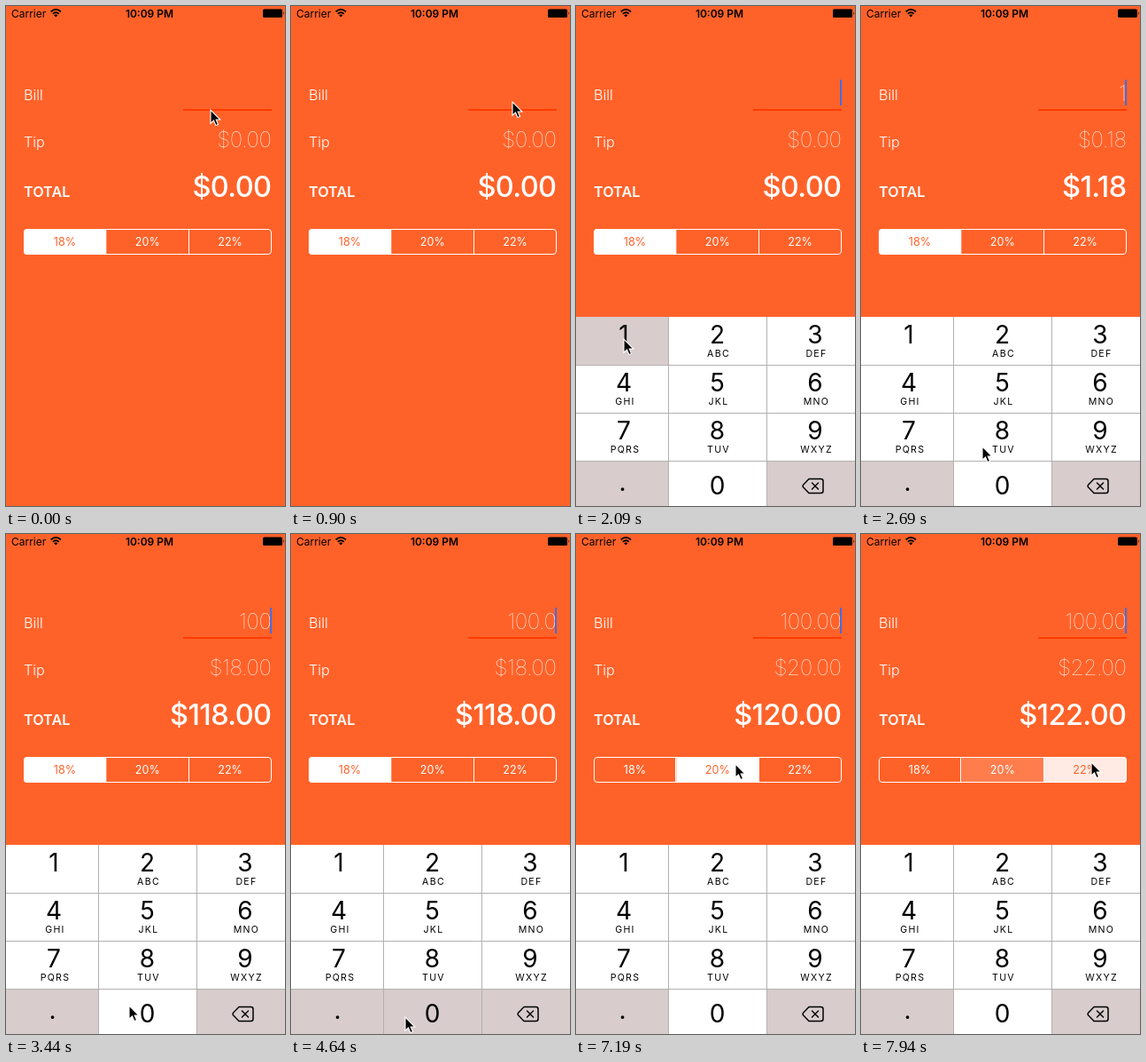
Recreate the animation shown at these times as an HTML page. Size 315 by 563 pixels, loop 8000 ms.

```html
<!DOCTYPE html>
<html lang="en">
<head>
<meta charset="utf-8">
<title>Tip calculator</title>
<style>
  html, body { margin: 0; width: 100%; height: 100%; overflow: hidden; background: #ff6229; }
  svg { display: block; width: 315px; height: 563px; font-family: Inter, Roboto, sans-serif; fill: #fff; }
  .status { font-size: 12px; fill: #000; }
  .label { font-size: 16.2px; font-weight: 300; }
  .amount { font-size: 24.5px; font-weight: 100; letter-spacing: -.5px; text-anchor: end; }
  .total { font-size: 32.5px; font-weight: 500; letter-spacing: -.6px; text-anchor: end; }
  .segment { font-size: 12.6px; text-anchor: middle; }
  .digit { font-size: 28px; fill: #000; text-anchor: middle; }
  .letters { font-size: 10.6px; letter-spacing: 1.3px; fill: #000; text-anchor: middle; }
</style>
</head>
<body>
<svg id="stage" viewBox="0 0 315 563">
  <defs><clipPath id="pill"><rect x="20" y="251" width="280" height="29" rx="4"/></clipPath></defs>
  <rect width="315" height="563" fill="#ff6229"/>

  <g class="status">
    <text x="6" y="12.5">Carrier</text>
    <text x="162" y="12.5" font-weight="600" text-anchor="middle">10:09 PM</text>
    <g fill="none" stroke="#000" stroke-width="1.8">
      <path d="M50.6 6.5Q56.3 1.3 62 6.5M52.8 8.9Q56.3 5.7 59.8 8.9"/>
    </g>
    <path d="M54.2 10.4Q56.3 8.8 58.4 10.4L56.3 12.6Z"/>
    <rect x="290" y="3.5" width="22" height="9.5" rx="1.6"/>
    <path d="M313 6.5q1.6 1.7 0 3.5z"/>
  </g>

  <text class="label" x="20" y="105.5">Bill</text>
  <text class="label" x="20" y="158.5">Tip</text>
  <text class="label" x="20" y="214.5" style="font-weight:600">TOTAL</text>
  <rect x="200" y="116" width="100" height="2" fill="#ff3b00"/>
  <text class="amount" id="bill" x="299.5" y="106.5"></text>
  <text class="amount" id="tip" x="299.5" y="158.5"></text>
  <text class="total" id="total" x="299.5" y="214.5"></text>
  <rect id="caret" x="298" y="83" width="2" height="29" fill="#4a6be0"/>

  <g id="segments" clip-path="url(#pill)"></g>
  <rect x="20.5" y="251.5" width="279" height="28" rx="3.5" fill="none" stroke="#fff"/>
  <path d="M112.5 251V280M206.5 251V280" stroke="#fff"/>

  <g id="keyboard">
    <rect y="350" width="315" height="213"/>
    <g id="keys"></g>
    <path d="M0 404.5H315M0 458.5H315M0 512.5H315M104.5 350V563M215.5 350V563" stroke="#b4b0b0" fill="none"/>
    <path d="M263 532.5H276.5Q279 532.5 279 535V546Q279 548.5 276.5 548.5H263L256.5 541.8Q255.5 540.5 256.5 539.2ZM266.5 537L273.5 544M273.5 537L266.5 544"
      fill="none" stroke="#000" stroke-width="1.5" stroke-linejoin="round" stroke-linecap="round"/>
  </g>

  <path id="cursor" d="M0 0V15.2L3.5 12L6 17.6L8.6 16.5L6.2 11H10.9Z" fill="#000" stroke="#fff" stroke-width="1.1"/>
</svg>

<script>
const DURATION = 8000;
const ORANGE = '#ff6229', GRAY = '#d8cccc', WHITE = '#fff';
const RATES = [18, 20, 22];
const LETTERS = ['', 'ABC', 'DEF', 'GHI', 'JKL', 'MNO', 'PQRS', 'TUV', 'WXYZ'];
const COLUMNS = [
  { x: 0, width: 104, middle: 54 },
  { x: 105, width: 110, middle: 159.5 },
  { x: 216, width: 99, middle: 270 }
];

// Each step changes part of the state and holds until the next one.
const STEPS = [
  [0, { cursor: [231, 117], bill: '', rate: 18, fills: [1, 0, 0], caret: false, drop: 213, pressed: '' }],
  [150, { cursor: [233, 112] }],
  [300, { cursor: [234, 109] }],
  [900, { cursor: [250, 108] }],
  [1050, { cursor: [257, 108] }],
  [1200, { caret: true, drop: 60 }],
  [1350, { drop: 0 }],
  [1490, { cursor: [232, 150] }],
  [1640, { cursor: [160, 250] }],
  [1790, { cursor: [85, 345], caret: false }],
  [1940, { cursor: [54, 375] }],
  [2090, { pressed: '1', caret: true }],
  [2240, { pressed: '', bill: '1' }],
  [2390, { cursor: [62, 390] }],
  [2540, { cursor: [105, 446] }],
  [2690, { cursor: [137, 496] }],
  [2840, { cursor: [139, 531], pressed: '0' }],
  [2990, { bill: '10', pressed: '' }],
  [3290, { pressed: '0' }],
  [3440, { bill: '100', pressed: '' }],
  [3590, { cursor: [122, 535] }],
  [3740, { cursor: [82, 540] }],
  [3890, { cursor: [55, 542], caret: false }],
  [4040, { pressed: '.', caret: true }],
  [4190, { bill: '100.' }],
  [4340, { cursor: [80, 543], pressed: '' }],
  [4490, { cursor: [129, 544], pressed: '0' }],
  [4640, { bill: '100.0' }],
  [4790, { bill: '100.00', pressed: '' }],
  [5240, { cursor: [131, 520] }],
  [5390, { cursor: [140, 435], caret: false }],
  [5540, { cursor: [152, 335] }],
  [5690, { cursor: [159, 275], caret: true }],
  [5840, { cursor: [161, 259] }],
  [6290, { fills: [1, .17, 0] }],
  [6440, { fills: [.17, .87, 0], rate: 20, caret: false }],
  [6590, { fills: [0, 1, 0] }],
  [6740, { caret: true }],
  [7190, { cursor: [180, 259] }],
  [7340, { cursor: [222, 258] }],
  [7490, { cursor: [252, 257], caret: false }],
  [7640, { cursor: [260, 257] }],
  [7790, { fills: [0, 1, .17], caret: true }],
  [7940, { fills: [0, .17, .87], rate: 22 }]
];

const find = id => document.getElementById(id);
const money = value => '$' + value.toFixed(2);

function add(parent, tag, attributes, text = '') {
  const node = document.createElementNS('http://www.w3.org/2000/svg', tag);
  for (const name in attributes) node.setAttribute(name, attributes[name]);
  node.textContent = text;
  return parent.appendChild(node);
}

const segments = RATES.map((rate, i) => {
  const x = 20 + i * 93.3;
  return {
    fill: add(find('segments'), 'rect', { x, y: 251, width: 93.3, height: 29 }),
    label: add(find('segments'), 'text', { class: 'segment', x: x + 46.5, y: 270 }, rate + '%')
  };
});

const keys = {};
function addKey(name, column, row, color) {
  const { x, width, middle } = COLUMNS[column];
  const y = 350 + row * 54;
  const box = add(find('keys'), 'rect', { x, y, width, height: row < 3 ? 54 : 51, fill: color });
  keys[name] = { box, color };
  return { middle, y };
}

LETTERS.forEach((letters, i) => {
  const { middle, y } = addKey(String(i + 1), i % 3, Math.floor(i / 3), WHITE);
  add(find('keys'), 'text', { class: 'digit', x: middle, y: y + 30 }, i + 1);
  add(find('keys'), 'text', { class: 'letters', x: middle + 1.5, y: y + 45 }, letters);
});
addKey('.', 0, 3, GRAY);
addKey('0', 1, 3, WHITE);
addKey('delete', 2, 3, GRAY);
add(find('keys'), 'text', { class: 'digit', x: 159.5, y: 550 }, '0');
add(find('keys'), 'text', { class: 'digit', x: 52.5, y: 546 }, '.');

function stateAt(time) {
  return Object.assign({}, ...STEPS.filter(([start]) => start <= time).map(([, change]) => change));
}

function render(state) {
  const bill = Number(state.bill);
  const tip = bill * state.rate / 100;
  find('bill').textContent = state.bill;
  find('tip').textContent = money(tip);
  find('total').textContent = money(bill + tip);
  find('caret').setAttribute('opacity', state.caret ? 1 : 0);
  find('keyboard').setAttribute('transform', `translate(0 ${state.drop})`);
  find('cursor').setAttribute('transform', `translate(${state.cursor})`);
  segments.forEach(({ fill, label }, i) => {
    fill.setAttribute('fill-opacity', state.fills[i]);
    label.setAttribute('fill', state.fills[i] > .5 ? ORANGE : WHITE);
  });
  for (const name in keys) {
    const { box, color } = keys[name];
    const pressedColor = color === WHITE ? GRAY : WHITE;
    box.setAttribute('fill', name === state.pressed ? pressedColor : color);
  }
}

const origin = performance.now();
function tick() {
  render(stateAt((performance.now() - origin) % DURATION));
  requestAnimationFrame(tick);
}
tick();
</script>
</body>
</html>
```
